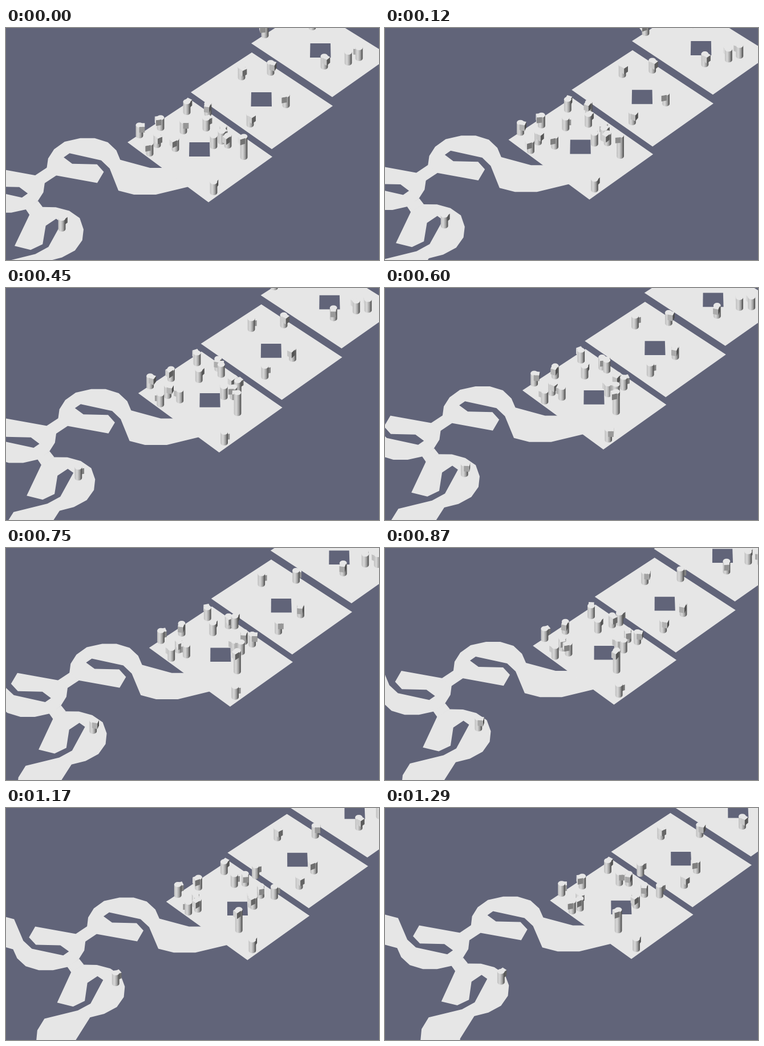
Write an HTML page with a canvas that moves like this. It is 654 by 408 pixels and loops after 1.32 s.

```html
<!DOCTYPE html>
<html>
<head>
<meta charset="utf-8">
<style>
  html, body { margin: 0; overflow: hidden; background: #616479; }
  canvas { display: block; }
</style>
</head>
<body>
<canvas id="stage" width="654" height="408"></canvas>
<script>
const ctx = document.getElementById('stage').getContext('2d');
const LOOP = 1320, STEP = 30, LAST = LOOP - STEP;
const SKY = '#616479', FLOOR = '#e6e6e6';
const HORIZON = -2700, CENTER = 327, DEPTH = 3000;
const SQUASH = 0.69, RADIUS = 6.4;

// The camera speeds up sideways while its forward motion eases out.
function camera(t) {
  const u = t / LAST;
  const side = 78.3 * u * (0.38 + 1.05 * u - 0.43 * u * u);
  const forward = 41.5 * (1 - (1 - u) ** 1.25);
  return [side / DEPTH, forward / DEPTH ** 2];
}

function toGround([x, y], t) {
  const [cx, cz] = camera(t), v = y - HORIZON;
  return [(x - CENTER) / v - cx, 1 / v - cz];
}

function toScreen([x, z], t) {
  const [cx, cz] = camera(t), v = 1 / (z + cz);
  return [CENTER + (x + cx) * v, v + HORIZON];
}

const parse = text => text.split(' ').map(p => p.split(',').map(Number));
const ground = [];
const addShape = (points, t, color = FLOOR) =>
  ground.push({ points: points.map(p => toGround(p, t)), color });

// One curl of road, repeated with turns and joined by two necks.
const curl = parse('0,0 -16,-13 -14,-29 -4,-45 14,-58 41,-64 66,-64 89,-57 104,-43 111,-27 163,-13 200,-13 ' +
  '240,17 174,33 136,33 109,26 93,-12 78,-26 23,-38 13,-31 28,-20 71,-19 83,-6 72,13');

function addCurl(x, y, [a, b, c, d]) {
  addShape(curl.map(([px, py]) => [x + a * px + b * py, y + c * px + d * py]), 1020);
}

addCurl(147, 225, [1, 0, 0, 1]);
addCurl(112, 225, [-1, 0, 0, -1]);
addCurl(103, 292, [-0.074, -1.515, 0.74, 0.07]);
addShape(parse('132,211 111,225 127,239 148,225'), 1020);
addShape(parse('117,269 96,283 103,293 125,279'), 1020);

// Square rooms in a row, each with a hole in the middle.
for (const i of [-1, 0, 1]) {
  const x = 324 + 108.5 * i - 2.5 * i * i, y = 113 - 87 * i + i * i;
  const ux = 107 - 5 * i, uy = -70 + 4 * i, dx = 142, dy = 100 - 5.5 * i;
  const hx = x + 106 - 2.5 * i;
  addShape([[x, y], [x + ux, y + uy], [x + ux + dx, y + uy + dy - 6], [x + dx, y + dy]], 0);
  addShape([[hx, y], [hx + 35.5, y], [hx + 36, y + 25], [hx - 0.5, y + 25]], 0, SKY);
}

// Foot position of each walker, followed by its stroll if it goes anywhere.
const crowd = parse('234,194 271,181 317,153 265,211 252,226 364,294 381,196 364,213 413,92 454,18 537,4 558,73 619,58 ' +
  '354,156,0,20 311,187,26,-12 351,182,24,-24 378,205,30,-8 389,212,-23,4 297,218,-31,3 ' +
  '464,84,18,4 491,141,-16,12 428,175,24,5 600,66,-5,-15 98,358,24,-5');

function makeWalker([x, y, dx = 0, dy = 0], i, height = 19) {
  const foot = y - RADIUS * SQUASH;
  return {
    from: toGround([x, foot], 0),
    to: toGround([x + dx, foot + dy], 0),
    heading: dx || dy ? Math.atan2(dy / SQUASH, dx) : i * 2.4,
    phase: i,
    height
  };
}

const walkers = crowd.map((spot, i) => makeWalker(spot, i));
walkers.push(makeWalker([417, 232, -84, 28], 0, 37));

function poseWalker({ from, to, heading, phase, height }, t) {
  const u = t / LAST;
  const [x, y] = toScreen(from.map((a, j) => a + (to[j] - a) * u), t);
  return { x, y, height, angle: heading + 0.6 * Math.sin(u * 2 * Math.PI + phase) };
}

function fillPoly(points, color) {
  ctx.fillStyle = color;
  ctx.beginPath();
  points.forEach(p => ctx.lineTo(...p));
  ctx.fill();
}

const grey = angle => {
  const level = Math.round(150 - 80 * Math.cos(angle));
  return `rgb(${level},${level},${level})`;
};

function drawBox(x, y, angle) {
  const half = 4.8, drop = 10;
  const mx = x + 4.5 * Math.cos(angle), my = y + 4.5 * SQUASH * Math.sin(angle);
  const corner = i => {
    const a = angle + (i - 0.5) * Math.PI / 2, r = half * Math.SQRT2;
    return [mx + r * Math.cos(a), my + r * SQUASH * Math.sin(a)];
  };
  for (let i = 0; i < 4; i++) {
    const normal = angle + i * Math.PI / 2;
    if (Math.sin(normal) <= 0) continue;
    const a = corner(i), b = corner(i + 1);
    fillPoly([a, b, [b[0], b[1] + drop], [a[0], a[1] + drop]], grey(normal));
  }
  fillPoly([0, 1, 2, 3].map(corner), FLOOR);
}

function drawBody(x, y, height) {
  const shade = ctx.createLinearGradient(x - RADIUS, 0, x + RADIUS, 0);
  ['#c0c0c0', '#d8d8d8', '#a4a4a4', '#484848'].forEach((c, i) => shade.addColorStop(i / 3, c));
  ctx.fillStyle = shade;
  ctx.beginPath();
  ctx.ellipse(x, y, RADIUS, RADIUS * SQUASH, 0, 0, Math.PI);
  ctx.lineTo(x - RADIUS, y - height);
  ctx.lineTo(x + RADIUS, y - height);
  ctx.fill();
  ctx.fillStyle = FLOOR;
  ctx.beginPath();
  ctx.ellipse(x, y - height, RADIUS, RADIUS * SQUASH, 0, 0, Math.PI * 2);
  ctx.fill();
}

function drawWalker({ x, y, angle, height }) {
  const parts = [() => drawBody(x, y, height), () => drawBox(x, y - height, angle)];
  if (Math.sin(angle) < 0) parts.reverse();
  parts.forEach(part => part());
}

function draw(t) {
  ctx.fillStyle = SKY;
  ctx.fillRect(0, 0, 654, 408);
  for (const { points, color } of ground) fillPoly(points.map(p => toScreen(p, t)), color);
  walkers.map(w => poseWalker(w, t)).sort((a, b) => a.y - b.y).forEach(drawWalker);
}

let start;
function tick(now) {
  start ??= now;
  draw(Math.floor((now - start) % LOOP / STEP) * STEP);
  requestAnimationFrame(tick);
}
draw(0);
requestAnimationFrame(tick);
</script>
</body>
</html>
```
